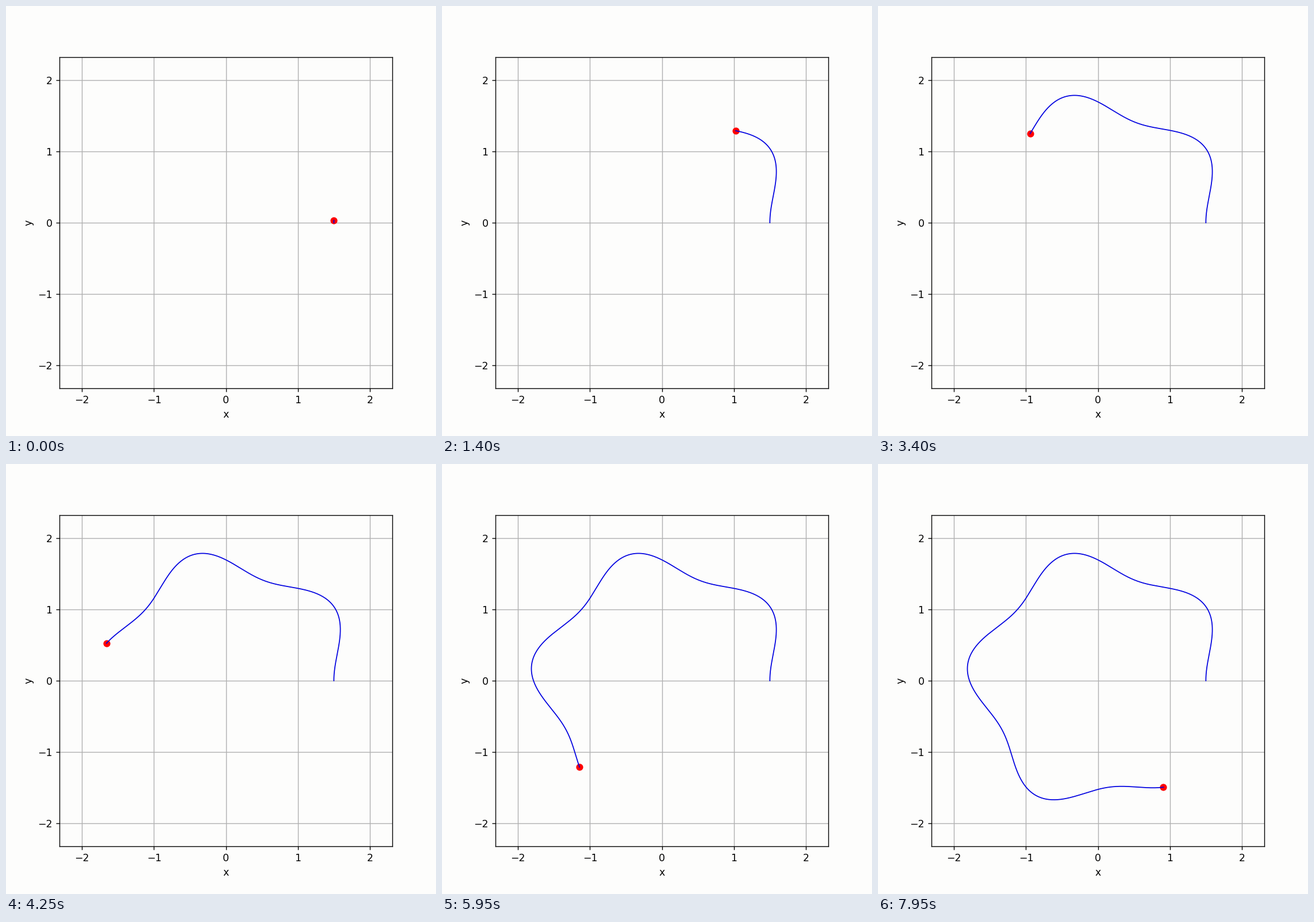
Animation, 748 px wide and 748 px high, one loop 8000 ms. Source, as a matplotlib script:

```python
import numpy as np
import matplotlib.pyplot as plt
from matplotlib.animation import FuncAnimation

SIZE, DPI = 748, 125
FRAMES, INTERVAL = 160, 50
PAPER, INK = "#fdfdfc", "#0000e0"

STEP = 0.17045                # radial phase advanced per frame
START = 0.097                 # radial phase in the first frame
APSIDAL = np.radians(69.2)    # angle swept per radial oscillation


def orbit(phase):
    """Position on a precessing orbit that oscillates between two radii."""
    r = 1.6625 - 0.1625 * np.cos(phase) + 0.011 * np.sin(phase) ** 2
    swing = 0.193 * np.sin(phase) + 0.007 * np.sin(2 * phase)
    theta = APSIDAL / (2 * np.pi) * (phase + swing)
    return r * np.cos(theta), r * np.sin(theta)


fig = plt.figure(figsize=(SIZE / DPI, SIZE / DPI), dpi=DPI, facecolor=PAPER)
# Axes box in pixels: left, bottom, width, height
ax = fig.add_axes([v / SIZE for v in (92.75, 83.03, 579.7, 575.96)],
                  facecolor=PAPER)
ax.set_xlim(-2.316, 2.316)
ax.set_ylim(-2.321, 2.321)
ax.set_xticks(range(-2, 3))
ax.set_yticks(range(-2, 3))
ax.set_xlabel("x")
ax.set_ylabel("y")
ax.grid(True)

dot, = ax.plot([], [], "ro", markersize=6)
trail, = ax.plot([], [], color=INK, linewidth=1)


def update(frame):
    end = START + STEP * frame
    x, y = orbit(np.linspace(0, end, 4 * frame + 4))
    trail.set_data(x, y)
    dot.set_data(x[-1:], y[-1:])
    return dot, trail


anim = FuncAnimation(fig, update, frames=FRAMES, interval=INTERVAL,
                     repeat=True, repeat_delay=0, blit=False)
plt.show()
```
